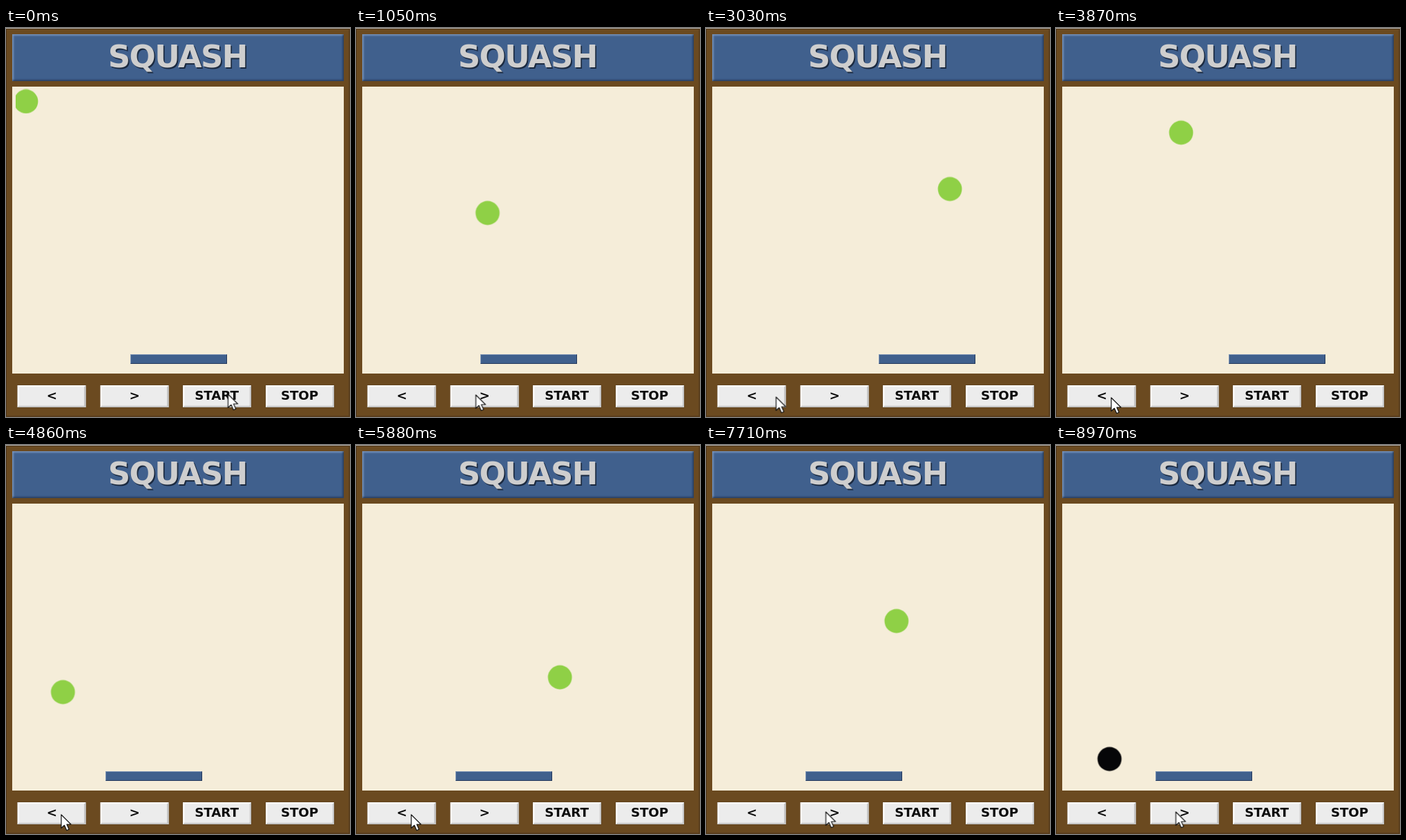
Write an HTML page that moves like this. It is 498x564 px and loops after 9 s.

```html
<!DOCTYPE html>
<html lang="en">
<head>
<meta charset="utf-8">
<title>Squash</title>
<style>
  html, body { margin: 0; width: 100%; height: 100%; overflow: hidden; background: #6b4a20; }
  svg { display: block; width: 498px; height: 564px; }
  text { font-family: "DejaVu Sans", Verdana, sans-serif; font-weight: bold; }
  .title { font-size: 45px; letter-spacing: -1.6px; }
  .label { font-size: 18.3px; letter-spacing: -.1px; text-anchor: middle; fill: #0c0c0c; }

  .ball-x, .ball-y, .ball, .paddle, .cursor { animation: 9s linear infinite; }
  .ball-x { animation-name: ball-x; }
  .ball-y { animation-name: ball-y; }
  .ball { animation-name: miss; animation-timing-function: step-end; }
  .paddle { animation-name: paddle; animation-timing-function: step-end; }
  .cursor { animation-name: cursor; animation-timing-function: ease-in-out; }

  @keyframes ball-x {
    0%, 3% { transform: translateX(29px); }
    11.667% { transform: translateX(190.3px); }
    25% { transform: translateX(436px); }
    27.09% { transform: translateX(474.5px); }
    43% { transform: translateX(181.3px); }
    51.13% { transform: translateX(28.3px); }
    65.333% { transform: translateX(295px); }
    74.99% { transform: translateX(475.5px); }
    85.667% { transform: translateX(276px); }
    96.33%, 100% { transform: translateX(77.5px); }
  }
  @keyframes ball-y {
    0%, 3% { transform: translateY(106.5px); }
    11.667% { transform: translateY(268px); }
    21.73% { transform: translateY(453.8px); }
    25% { transform: translateY(393.5px); }
    40.56% { transform: translateY(106.5px); }
    43% { transform: translateY(151.5px); }
    59.11% { transform: translateY(454px); }
    65.333% { transform: translateY(337px); }
    77.69% { transform: translateY(106px); }
    85.667% { transform: translateY(255px); }
    96.33%, 100% { transform: translateY(455.3px); }
  }
  @keyframes miss {
    0% { fill: #8fd046; }
    96.33%, 100% { fill: #060608; }
  }
  @keyframes paddle {
    0% { transform: translateX(180px); }
    15% { transform: translateX(215px); }
    18% { transform: translateX(250px); }
    45% { transform: translateX(215px); }
    48% { transform: translateX(179.5px); }
    51%, 100% { transform: translateX(144px); }
  }
  @keyframes cursor {
    0%, 4.5% { transform: translate(321.5px, 531px); }
    9.5%, 29% { transform: translate(173.5px, 532px); }
    36%, 70% { transform: translate(80px, 536px); }
    78%, 100% { transform: translate(173.5px, 532px); }
  }
</style>
</head>
<body>
<svg viewBox="0 0 498 564">
  <defs>
    <clipPath id="court"><rect x="14" y="85" width="475" height="416"/></clipPath>
    <clipPath id="banner"><rect x="9" y="9" width="480" height="68"/></clipPath>
    <filter id="soft" filterUnits="userSpaceOnUse" x="0" y="0" width="498" height="90">
      <feGaussianBlur stdDeviation="1.2"/>
    </filter>
    <g id="button">
      <rect x="-.5" y="-.5" width="100" height="33" fill="#5a3f1d"/>
      <rect width="99" height="32" fill="#fcfcfc"/>
      <path d="M0 32L2.5 29.5H96.5V2.5L99 0V32Z" fill="#c6c6c6"/>
      <rect x="2.5" y="2.5" width="94" height="27" fill="#ececec"/>
    </g>
  </defs>

  <rect width="498" height="564" fill="#6b4a20"/>
  <path d="M.5 1.5H497V563H.5Z" fill="none" stroke="#49331a"/>
  <rect width="498" height="1" fill="#b5b0a8"/>

  <rect x="9" y="9" width="480" height="68" fill="#40608d"/>
  <g clip-path="url(#banner)">
    <g filter="url(#soft)" fill="none" stroke-width="4">
      <path d="M9 78V9H490" stroke="#7391b9"/>
      <path d="M9 77H489V9" stroke="#2a4163"/>
    </g>
  </g>
  <g class="title">
    <text x="149.5" y="59" fill="#1b2a40">SQUASH</text>
    <text x="147.8" y="57.3" fill="#cecece">SQUASH</text>
  </g>

  <rect x="9" y="85" width="480" height="416" fill="#f5edd9"/>

  <g class="paddle">
    <rect y="473" width="140" height="14" fill="#7c94b5"/>
    <path d="M0 487L1 486H139V474L140 473V487Z" fill="#22375a"/>
    <rect x="1" y="474" width="138" height="12" fill="#40608d"/>
  </g>

  <g clip-path="url(#court)">
    <g class="ball-x"><g class="ball-y"><circle class="ball" r="17.4"/></g></g>
  </g>

  <use href="#button" x="16.5" y="518"/>
  <use href="#button" x="136.5" y="518"/>
  <use href="#button" x="256" y="518"/>
  <use href="#button" x="376" y="518"/>
  <g class="label">
    <text x="66.3" y="539">&lt;</text>
    <text x="186" y="539">&gt;</text>
    <text x="305" y="539">START</text>
    <text x="425" y="539">STOP</text>
  </g>

  <path class="cursor" d="M0 0V19.5L4.5 15.3L7.8 22.7L11.2 21.2L8 14H14Z"
    fill="#fff" stroke="#111" stroke-width="1.2" stroke-linejoin="round"/>
</svg>
</body>
</html>
```
